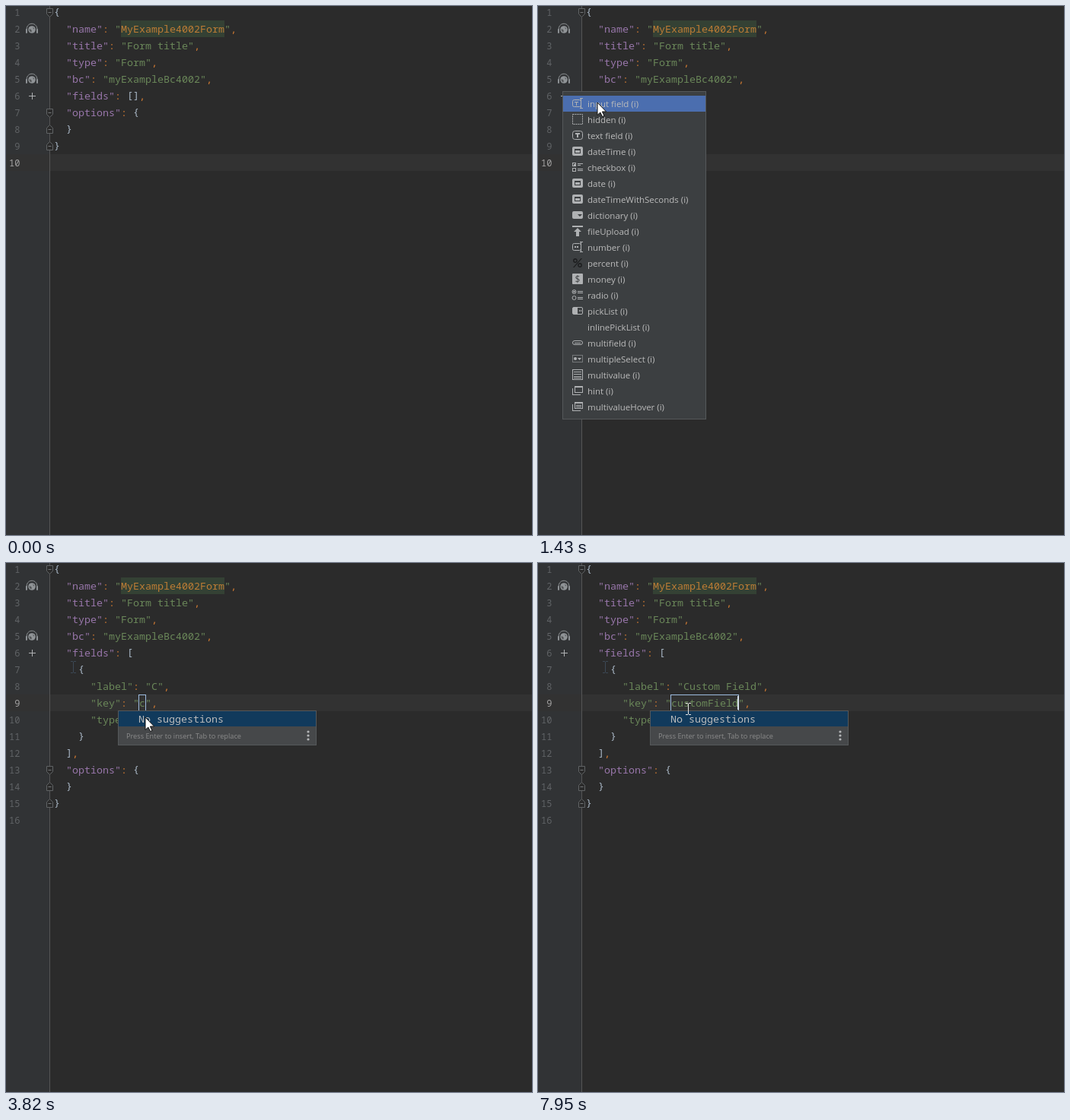
Recreate the animation shown at these times as an HTML page with a canvas. Size 691x696 px, loop 8 s.

```html
<!DOCTYPE html>
<html lang="en">
<head>
<meta charset="utf-8">
<title>Form editor</title>
<style>
html, body { margin: 0; width: 100%; height: 100%; overflow: hidden; background: #2b2b2b; }
canvas { display: block; }
</style>
</head>
<body>
<canvas id="stage" width="691" height="696"></canvas>
<script>
const g = document.getElementById('stage').getContext('2d');
const LOOP = 8000, ROW = 22, COL = 8, LEFT = 63;
const MONO = '"Noto Sans Mono", "DejaVu Sans Mono", monospace';
const UI = '"Open Sans", "Noto Sans", sans-serif';
const C = {
  bg: '#2b2b2b', gutter: '#313335', row: '#323232', plain: '#a9b7c6', key: '#9876aa',
  str: '#6a8759', punct: '#cc7832', icon: '#afb1b3', menu: '#3c3f41'
};

// Moments of the scene
const MENU_ON = 860, MENU_HOVER = 1370, MENU_OFF = 1790, INSERT = 1880, POPUP = 2140;
const KEYS = [3050, 3920, 4130, 4630, 5070, 5380, 6100, 6410, 6740, 7070, 7320];
const MOUSE = [
  [30, 637, 686], [450, 25, 80], [600, 33, 119], [1310, 33, 119], [1430, 78, 127],
  [1790, 78, 127], [1880, 88, 137], [2230, 180, 206], [2520, 183, 203],
  [7780, 183, 203], [7950, 197, 192]
];
const ITEMS = ['input field', 'hidden', 'text field', 'dateTime', 'checkbox', 'date',
  'dateTimeWithSeconds', 'dictionary', 'fileUpload', 'number', 'percent', 'money', 'radio',
  'pickList', 'inlinePickList', 'multifield', 'multipleSelect', 'multivalue', 'hint', 'multivalueHover'];

const HEAD = ['{', '  "name": "MyExample4002Form",', '  "title": "Form title",',
  '  "type": "Form",', '  "bc": "myExampleBc4002",'];
const TAIL = ['  "options": {', '  }', '}', ''];

function rect(x, y, w, h, color) {
  g.fillStyle = color;
  g.fillRect(x, y, w, h);
}
function frame(x, y, w, h, color) {
  g.strokeStyle = color;
  g.lineWidth = 1;
  g.strokeRect(x + .5, y + .5, w - 1, h - 1);
}
function text(s, x, y, color, size = 13.333, font = MONO, align = 'left') {
  g.font = size + 'px ' + font;
  g.textAlign = align;
  g.fillStyle = color;
  g.fillText(s, x, y);
}
function poly(pts, fill, stroke) {
  g.beginPath();
  pts.forEach(p => g.lineTo(p[0], p[1]));
  g.closePath();
  if (fill) { g.fillStyle = fill; g.fill(); }
  if (stroke) { g.strokeStyle = stroke; g.lineWidth = 1; g.stroke(); }
}
function disc(x, y, r, color) {
  g.beginPath();
  g.arc(x, y, r, 0, 7);
  g.fillStyle = color;
  g.fill();
}
function ring(x, y, r, color, from = 0, to = 7, width = 1) {
  g.beginPath();
  g.arc(x, y, r, from, to);
  g.strokeStyle = color;
  g.lineWidth = width;
  g.stroke();
}
function round(x, y, w, h, r, fill, stroke) {
  g.beginPath();
  g.roundRect(x, y, w, h, r);
  g.lineWidth = 1;
  if (fill) { g.fillStyle = fill; g.fill(); }
  if (stroke) { g.strokeStyle = stroke; g.stroke(); }
}
function at(x, y, draw) {
  g.save();
  g.translate(x, y);
  draw();
  g.restore();
}

// Editor
function codeLine(s, n) {
  const y = 13 + (n - 1) * ROW;
  const inner = s.startsWith('      ');
  for (const m of s.matchAll(/"[^"]*"|[:,]|[^\s":,]+/g)) {
    const x = LEFT + m.index * COL, tok = m[0];
    if (tok.startsWith('"MyEx')) {
      rect(x + COL, y - 16, (tok.length - 2) * COL, ROW, '#344134');
      text('"', x, y, C.str);
      text(tok.slice(1, -1), x + COL, y, '#bd7c35');
      text('"', x + (tok.length - 1) * COL, y, C.str);
    } else if (tok[0] === '"') {
      text(tok, x, y, s[m.index + tok.length] === ':' && !inner ? C.key : C.str);
    } else if (/[:,]/.test(tok)) {
      text(tok, x, y, C.punct);
    } else text(tok, x, y - 1, C.plain); // brackets sit higher
  }
}
function fold(n, up) {
  at(57.5, 8.5 + (n - 1) * ROW, () => {
    const d = up ? -1 : 1;
    poly([[-4, -5 * d], [4, -5 * d], [4, 2 * d], [0, 6 * d], [-4, 2 * d]], C.bg, '#606365');
    rect(-2, -.5, 4, 1, '#737678');
  });
}
function linkIcon(n) {
  at(34, 8 + (n - 1) * ROW, () => {
    const tone = '#8d9194';
    ring(0, 0, 6.8, tone, Math.PI * .95, Math.PI * 2.05);
    round(-8, 0, 2, 6, 1, tone);
    round(6, 0, 2, 6, 1, tone);
    disc(0, 1, 4.8, '#8f9396');
    poly([[-3.5, 0], [-1, 1], [0, 3], [-1, 4.5], [-3, 3]], '#55585a');
    poly([[1, -2], [3, -1], [2.5, 1]], '#55585a');
  });
}
function plus() {
  rect(30, 118, 9, 1, C.icon);
  rect(34, 114, 1, 9, C.icon);
}
function editor(t, typed, caretOn) {
  const filled = t >= INSERT;
  const key = 'customField'.slice(0, typed);
  const label = 'Custom Field'.slice(0, typed > 6 ? typed + 1 : typed);
  const body = filled
    ? ['  "fields": [', '    {', `      "label": "${label}",`, `      "key": "${key}",`,
       '      "type": "input"', '    }', '  ],']
    : ['  "fields": [],'];
  const lines = [...HEAD, ...body, ...TAIL];
  const current = filled ? 9 : 10;

  rect(0, 0, 691, 696, C.bg);
  rect(0, 0, 57, 696, C.gutter);
  rect(0, 195 + (current - 10) * ROW, 691, ROW, C.row);
  rect(57, 0, 1, 696, '#555555');

  lines.forEach((s, i) => {
    text(i + 1, 18.5, 13 + i * ROW, i + 1 === current ? '#a4a3a3' : '#606366', 12, MONO, 'right');
    codeLine(s, i + 1);
  });
  const end = lines.length;
  fold(1);
  fold(end - 3);
  fold(end - 2, true);
  fold(end - 1, true);
  linkIcon(2);
  linkIcon(5);
  plus();

  if (filled) {
    beam(88, 137, '#3c4956');
    const w = key.length * COL;
    frame(174, 173, w + (w ? 2 : 3), 22, '#9dbbdf');
    if (caretOn) rect(174 + w, 175, 2, 18, '#d5deea');
  }
}

// Menu icons, each drawn around its own centre
const bar = (x, y, w, h = 1) => rect(x, y, w, h, C.icon);
const box = (x, y, w, h) => frame(x, y, w, h, C.icon);
function inputIcon(mark) {
  round(-6.5, -4.5, 11, 9, 2, null, C.icon);
  bar(4, -7, 1, 13);
  bar(3, -7, 4);
  bar(3, 6, 4);
  if (mark === 'T') { bar(-4, -2, 5); bar(-2, -2, 1, 5); }
  else { bar(-4, -1, 2, 2); bar(-1, -1, 2, 2); }
}
function dateIcon() {
  round(-7, -6, 14, 12, 2, C.icon);
  rect(-4, -3, 8, 6, C.menu);
  bar(-3, -1, 6, 3);
}
function hintIcon() {
  box(-4, -6, 11, 9);
  bar(-4, -6, 11, 2);
  bar(-7, -3, 1, 9);
  bar(-7, 5, 11);
}
function dashed(x, y, w, h, gap) {
  g.setLineDash(gap);
  box(x, y, w, h);
  g.setLineDash([]);
}
const ICONS = {
  'input field': () => inputIcon('T'),
  'hidden': () => dashed(-7, -7, 14, 14, [2, 1]),
  'text field': () => {
    round(-6.5, -5.5, 13, 11, 3, null, C.icon);
    bar(-3, -3, 6, 2);
    bar(-1, -3, 2, 6);
  },
  'dateTime': dateIcon,
  'date': dateIcon,
  'dateTimeWithSeconds': dateIcon,
  'checkbox': () => {
    [-6, 1].forEach(y => { box(-7, y, 5, 5); bar(0, y + 1, 7); bar(0, y + 3, y < 0 ? 4 : 7); });
    bar(-5, -4, 2, 2);
  },
  'dictionary': () => {
    round(-7, -5, 14, 10, 2, C.icon);
    poly([[0, -1], [6, -1], [3, 2]], C.menu);
  },
  'fileUpload': () => {
    bar(-7, -7, 14, 2);
    poly([[0, -4], [5, 1], [2, 1], [2, 7], [-2, 7], [-2, 1], [-5, 1]], C.icon);
  },
  'number': () => inputIcon(),
  'percent': () => {
    ring(-3, -3, 2.2, '#1c1d1e', 0, 7, 1.4);
    ring(3, 3, 2.2, '#1c1d1e', 0, 7, 1.4);
    poly([[4.5, -6], [6, -6], [-4.5, 6], [-6, 6]], '#1c1d1e');
  },
  'money': () => {
    round(-7, -7, 14, 14, 1, C.icon);
    text('$', 0, 4.5, C.menu, 12, UI, 'center');
  },
  'radio': () => {
    [-4, 4].forEach(y => { ring(-4.5, y, 2.5, C.icon); bar(0, y - 1, 7); bar(0, y + 1, 7); });
    disc(-4.5, -4, 1.2, C.icon);
  },
  'pickList': () => {
    round(-6.5, -4.5, 13, 9, 1.5, null, C.icon);
    bar(-6, -4, 6, 8);
    bar(2, -1, 1, 2);
    bar(4, -1, 1, 2);
  },
  'multifield': () => {
    round(-6.5, -2.5, 13, 5, 2.5, null, C.icon);
    bar(-4, 0, 8);
  },
  'multipleSelect': () => {
    dashed(-7, -5, 14, 10, [1, 1]);
    disc(-3, 0, 2, C.icon);
    poly([[0, -1], [5, -1], [2.5, 2]], C.icon);
  },
  'multivalue': () => {
    box(-7, -7, 14, 14);
    [-4, -1, 2, 4].forEach(y => bar(-5, y, 10));
  },
  'hint': hintIcon,
  'multivalueHover': () => {
    hintIcon();
    bar(-2, -2, 7);
    bar(-2, 0, 7);
  }
};
function menu(hover) {
  rect(32, 112, 189, 432, C.menu);
  frame(32, 112, 189, 432, '#55585a');
  if (hover) rect(33, 118, 187, 21, '#4b6eaf');
  ITEMS.forEach((name, i) => {
    const y = 128 + i * 21;
    if (ICONS[name]) at(52, y, ICONS[name]);
    text(name + ' (i)', 65, y + 5, '#bbbbbb', 11.5, UI);
  });
}

// Completion list
function popup(typed) {
  const h = typed ? 46 : 66;
  rect(147, 194, 261, h, '#46484a');
  rect(148, 195, 259, 20, '#113a5c');
  frame(147, 194, 261, h, '#55585a');
  if (typed) text('No suggestions', 174, 210, '#bbbbbb');
  else [['vstamp', 'long'], ['id', 'String']].forEach(([name, type], i) => {
    const y = 205 + i * 20;
    disc(162, y, 7, '#b08443');
    text('f', 162, y + 4, '#3a3022', 10.5, MONO, 'center');
    text(name, 174, y + 5, '#bbbbbb');
    text(type, 396, y + 5, '#8a8a8a', 13.333, MONO, 'right');
  });
  const foot = 194 + h - 13;
  text('Press Enter to insert, Tab to replace', 158, foot + 4, '#8c8c8c', 9.2, UI);
  [-5, 0, 5].forEach(d => disc(397, foot + d, 1.6, '#b4b6b8'));
}

// Mouse pointers
function beam(x, y, color) {
  rect(x - 3, y - 8, 3, 1, color);
  rect(x + 1, y - 8, 3, 1, color);
  rect(x, y - 7, 1, 14, color);
  rect(x - 3, y + 7, 3, 1, color);
  rect(x + 1, y + 7, 3, 1, color);
}
function arrow(x, y) {
  at(x, y, () => poly([[0, 0], [0, 16.5], [3.8, 13], [6.6, 18.6], [9, 17.5], [6.4, 12], [11.6, 12]],
    '#fff', '#111'));
}
function hand(x, y) {
  at(x, y, () => {
    poly([[-1.5, 2], [0, .5], [2, 2], [2, 8], [5, 8], [8, 9], [10.5, 10.5], [10.5, 17], [8.5, 20],
      [8.5, 23], [0, 23], [-1, 20], [-5, 15], [-5, 12.5], [-3, 12], [-1.5, 14]], '#fff', '#222');
    [3.5, 6].forEach(px => rect(px, 10, 1, 3, '#aaa'));
  });
}
function mouseAt(t) {
  const i = MOUSE.findIndex(k => k[0] > t);
  if (i < 0) return MOUSE[MOUSE.length - 1].slice(1);
  const [t0, x0, y0] = MOUSE[i - 1], [t1, x1, y1] = MOUSE[i];
  const p = (t - t0) / (t1 - t0), e = p * p * (3 - 2 * p);
  return [x0 + (x1 - x0) * e, y0 + (y1 - y0) * e];
}
function pointer(t) {
  if (t < 30) return;
  const [x, y] = mouseAt(t).map(Math.round);
  const overMenu = t >= MENU_ON && t < MENU_OFF;
  const overPopup = t >= POPUP && x > 147 && y > 194;
  const overIcon = x > 25 && x < 43 && [30, 96, 118].some(c => Math.abs(y - c) < 9);
  if (overMenu || overPopup) arrow(x, y);
  else if (overIcon) hand(x, y);
  else if (x < 58) arrow(x, y);
  else beam(x, y, '#e4e4e4');
}

function draw(t) {
  const typed = KEYS.filter(k => k <= t).length;
  const caretOn = !(t >= 2850 && t < 3050 || t >= 3820 && t < 3920);
  editor(t, typed, caretOn);
  if (t >= MENU_ON && t < MENU_OFF) menu(t >= MENU_HOVER);
  if (t >= POPUP) popup(typed);
  pointer(t);
}
const start = performance.now();
function tick() {
  draw((performance.now() - start) % LOOP);
  requestAnimationFrame(tick);
}
tick();
</script>
</body>
</html>
```
